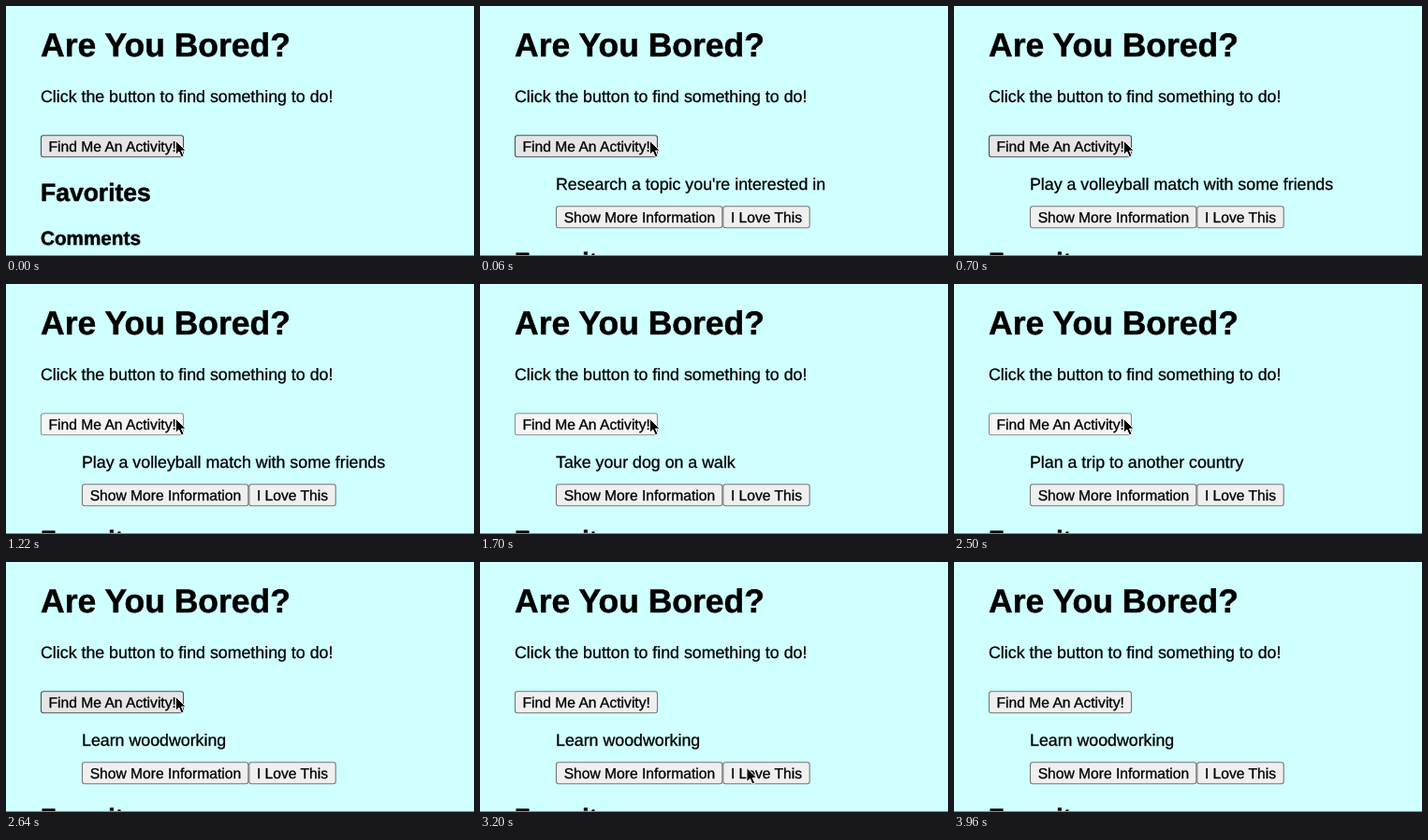
Write an HTML page that moves like this. It is 500x268 px and loops after 4580 ms.

```html
<!DOCTYPE html>
<html lang="en">
<head>
<meta charset="utf-8">
<title>Are You Bored?</title>
<style>
  html, body { margin: 0; width: 100%; height: 100%; overflow: hidden; background: #cfffff; }
  svg { display: block; width: 100vw; height: 100vh; }
  text {
    font-family: "Liberation Sans", Arial, Helvetica, sans-serif; font-size: 17.8px;
    stroke: #000; stroke-width: 0.3; text-rendering: geometricPrecision;
  }
  .h { font-weight: bold; stroke-width: 0.5; }
  .b text { font-size: 15.64px; text-anchor: middle; }
  .b rect { fill: #efefef; stroke: #767676; stroke-width: 1.1; }
  .b.hover rect { fill: #e5e5e5; stroke: #4f4f4f; }
  .b.active rect { fill: #f5f5f5; stroke: #8d8d8d; }
</style>
</head>
<body>
<svg viewBox="0 0 500 268">
  <rect width="500" height="268" fill="#cfffff"/>
  <text class="h" x="37" y="54.4" style="font-size:35.5px">Are You Bored?</text>
  <text x="37" y="103.2">Click the button to find something to do!</text>
  <g id="find" class="b">
    <rect x="37.5" y="138.8" width="152" height="23" rx="2.5"/>
    <text x="113.7" y="155.6">Find Me An Activity!</text>
  </g>
  <g id="result">
    <text id="activity" x="81" y="197"></text>
    <g class="b">
      <rect x="81.5" y="214.7" width="177.3" height="23" rx="2.5"/>
      <text x="170.4" y="231.5">Show More Information</text>
    </g>
    <g class="b">
      <rect x="259.8" y="214.7" width="92.4" height="23" rx="2.5"/>
      <text x="306" y="231.5">I Love This</text>
    </g>
  </g>
  <g id="below">
    <text class="h" x="37" y="208.6" style="font-size:26.5px">Favorites</text>
    <text class="h" x="37" y="255.7" style="font-size:20.7px">Comments</text>
  </g>
  <rect y="267" width="500" height="1" fill="#859090"/>
  <path id="cursor" d="M0 0V15.2L3.5 11.9L6 17.6L8.7 16.4L6.2 10.9H10.8Z"
        fill="#000" stroke="#fff" stroke-width="1" stroke-linejoin="round"/>
</svg>
<script>
const LOOP = 4580, LEAVE = 3140, GONE = 3220;
const $ = id => document.getElementById(id);
const find = $("find"), result = $("result"), activity = $("activity"),
      below = $("below"), cursor = $("cursor");

// Each click: press, release, answer shown
const clicks = [
  [-1, -1, 20, "Research a topic you're interested in"],
  [560, 640, 700, "Play a volleyball match with some friends"],
  [1160, 1340, 1440, "Take your dog on a walk"],
  [1700, 1800, 1960, "Go see a Broadway production"],
  [2180, 2240, 2280, "Plan a trip to another country"],
  [2500, 2560, 2640, "Learn woodworking"]
];

function render(t) {
  const shown = clicks.filter(c => t >= c[2]).pop();
  const pressed = clicks.some(c => t >= c[0] && t < c[1]);
  activity.textContent = shown ? shown[3] : "";
  result.style.display = shown ? "" : "none";
  below.setAttribute("transform", `translate(0 ${shown ? 74 : 0})`);
  find.setAttribute("class", "b " + (pressed ? "active" : t < LEAVE + 20 ? "hover" : ""));

  const k = Math.min(1, Math.max(0, (t - LEAVE) / (GONE - LEAVE)));
  cursor.style.display = t < GONE ? "" : "none";
  cursor.setAttribute("transform", `translate(${181.3 + 136 * k} ${144.3 + 100 * k})`);
}

const start = performance.now();
function tick() {
  render((performance.now() - start) % LOOP);
  requestAnimationFrame(tick);
}
tick();
</script>
</body>
</html>
```
